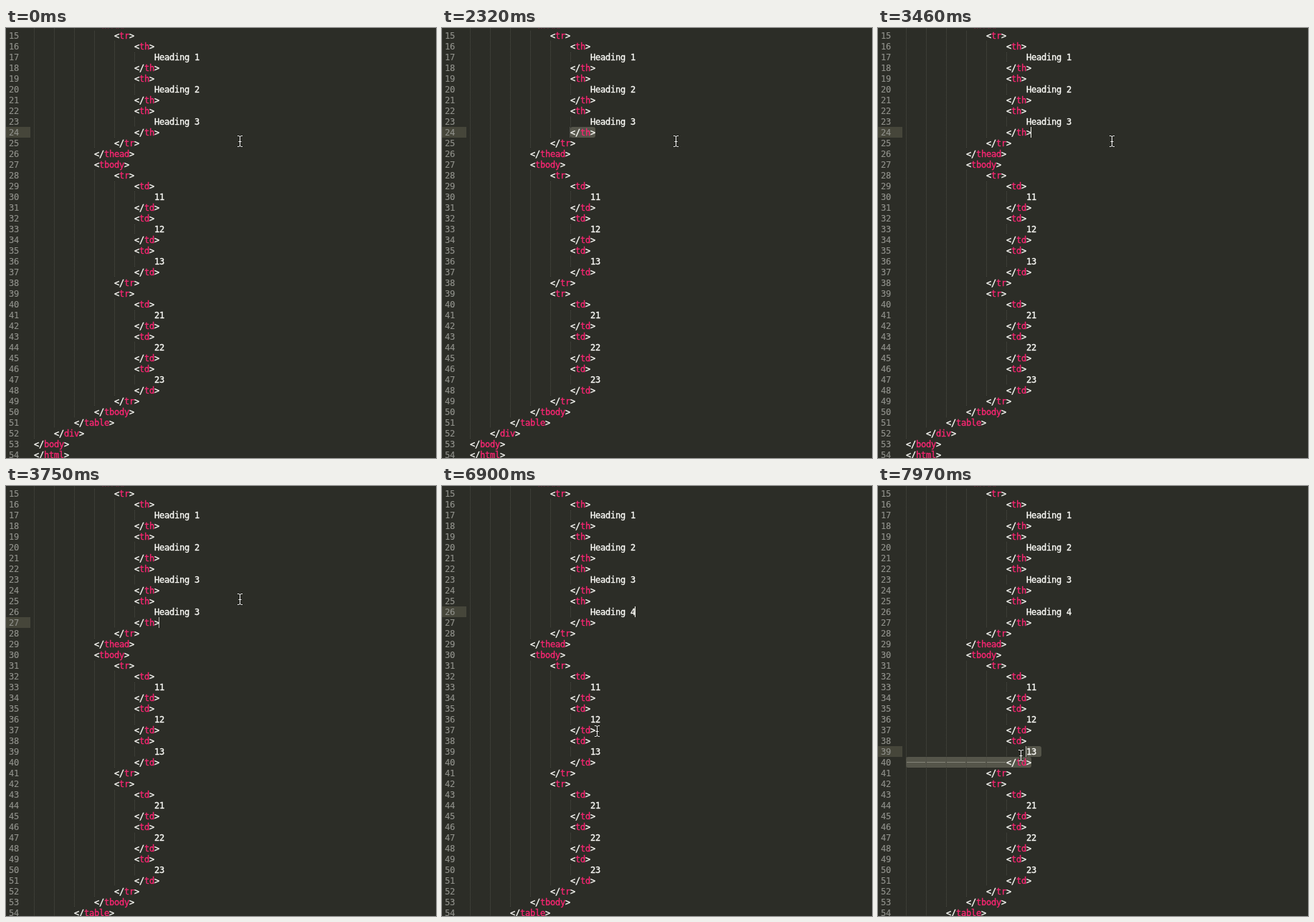
Animation of 600 by 600 pixels, one loop 8000 ms. Source, as an HTML page with a canvas:

```html
<!DOCTYPE html>
<html lang="en">
<head>
<meta charset="utf-8">
<title>Code editor</title>
<style>
  html, body { margin: 0; width: 100%; height: 100%; overflow: hidden; background: #2c2d27; }
  canvas { display: block; }
</style>
</head>
<body>
<canvas id="stage" width="600" height="600"></canvas>
<script>
const ctx = document.getElementById('stage').getContext('2d');
const LOOP = 8000, CHAR = 7, LINE = 15, TAB = 4, LEFT = 39, FIRST = 14;
const DRAG = 7500, BLINK = 1040;
const WHITE = '#fcfcf8', PINK = '#f92672';

const clamp = (v, lo = 0, hi = 1) => Math.min(hi, Math.max(lo, v));
const rowY = row => 3 + (row - 15) * LINE;
const colX = col => LEFT + col * CHAR;

// Key presses: time, caret row, caret column, whether text is selected to the line end of row 24
const keys = [
  [-595, 24, 25], [1850, 24, 20, true], [2410, 23, 20, true], [2530, 22, 20, true],
  [3140, 24, 25], [3540, 25, 20], [3750, 27, 25], [4330, 26, 25], [4690, 26, 33],
  [4860, 26, 32], [5130, 26, 33], [5650, 26, 32], [5760, 26, 33]
];

// Pointer path: time, x, y
const path = [
  [6650, 326, 158], [6900, 216, 342], [7030, 206, 388], [7180, 207, 397],
  [7440, 215, 392], [7600, 215, 392], [7780, 207, 385], [7960, 199, 376]
];

function pointer(t) {
  if (t <= path[0][0]) return path[0].slice(1);
  const i = path.findIndex(p => p[0] > t);
  if (i < 0) return path[path.length - 1].slice(1);
  const a = path[i - 1], b = path[i], u = (t - a[0]) / (b[0] - a[0]);
  return [1, 2].map(k => a[k] + (b[k] - a[k]) * u);
}

// Each line is [indent, text]
const wrap = (tag, indent, inner) => [[indent, `<${tag}>`], ...inner, [indent, `</${tag}>`]];
const cell = (tag, text) => wrap(tag, 5, [[6, text]]);

function documentAt(t) {
  const heads = [1, 2, 3].flatMap(n => cell('th', 'Heading ' + n));
  if (t >= 3750) {
    heads.push(...cell('th', 'Heading ' + (t < 5650 ? '3' : t < 5760 ? '' : '4')));
  } else if (t >= 3540) {
    heads.push([5, '']);
  }
  const rows = [1, 2].flatMap(r => wrap('tr', 4, [1, 2, 3].flatMap(c => cell('td', `${r}${c}`))));
  return [
    ...wrap('thead', 3, wrap('tr', 4, heads)),
    ...wrap('tbody', 3, rows),
    [2, '</table>'], [1, '</div>'], [0, '</body>'], [0, '</html>']
  ];
}

const lineEnd = ([indent, text]) => indent * TAB + text.length;

function caretAt(t, lines) {
  if (t < DRAG) {
    const [time, row, col, selecting] = keys.filter(k => k[0] <= t).pop();
    return { row, col, age: t - time, anchor: selecting && [24, 25] };
  }
  const [x, y] = pointer(t);
  const row = 15 + Math.floor((y - 3) / LINE);
  const line = lines[row - FIRST];
  let col = (x - LEFT) / CHAR;
  col = col < line[0] * TAB ? Math.round(col / TAB) * TAB : Math.round(col);
  return { row, col: Math.min(col, lineEnd(line)), age: 0, anchor: [40, 25] };
}

function blink(age) {
  return clamp(0.5 + 0.84 * Math.cos((age - 195) / BLINK * 2 * Math.PI)) ** 2;
}

function drawSelection(caret, lines) {
  const [endRow, endCol] = caret.anchor;
  for (let row = caret.row; row <= endRow; row++) {
    const line = lines[row - FIRST], y = rowY(row);
    const from = row === caret.row ? caret.col : 0;
    const to = row === endRow ? endCol : lineEnd(line) + 1;
    if (from >= to) continue;
    ctx.fillStyle = '#55554a';
    ctx.beginPath();
    ctx.roundRect(colX(from), y, (to - from) * CHAR, LINE, 3);
    ctx.fill();
    ctx.fillStyle = '#858579';
    for (let tab = Math.ceil(from / TAB); tab < line[0]; tab++) {
      ctx.fillRect(colX(tab * TAB) + 1, y + 7, TAB * CHAR - 2, 1);
    }
  }
}

function drawText(text, x, y, colorOf) {
  [...text].forEach((ch, i) => {
    ctx.fillStyle = ctx.strokeStyle = colorOf(ch);
    ctx.fillText(ch, x + i * CHAR, y);
    ctx.strokeText(ch, x + i * CHAR, y);
  });
}

function drawLine([indent, text], row) {
  const y = rowY(row);
  ctx.fillStyle = '#4c4d45';
  for (let i = 0; i < indent; i++) {
    for (let dot = y + y % 2; dot < y + LINE; dot += 2) ctx.fillRect(colX(i * TAB), dot, 1, 1);
  }
  ctx.lineWidth = 0.15;
  drawText(String(row), 4, y + 12, () => '#90918b');
  const isTag = text[0] === '<';
  ctx.lineWidth = 0.35;
  drawText(text, colX(indent * TAB), y + 12, ch => isTag && !'</>'.includes(ch) ? PINK : WHITE);
}

function drawPointer(x, y) {
  ctx.save();
  ctx.translate(Math.round(x) + 0.5, Math.round(y));
  const beam = new Path2D('M-3.5-7.5H-2Q0-7.5 0-5.5Q0-7.5 2-7.5H3.5M0-5.5V5.5M-3.5 7.5H-2Q0 7.5 0 5.5Q0 7.5 2 7.5H3.5M-2 .5H2');
  for (const [color, width] of [['rgba(20,20,16,.55)', 2.4], ['#fff', 1]]) {
    ctx.strokeStyle = color;
    ctx.lineWidth = width;
    ctx.stroke(beam);
  }
  ctx.restore();
}

function draw(t) {
  const lines = documentAt(t), caret = caretAt(t, lines);
  ctx.fillStyle = '#2c2d27';
  ctx.fillRect(0, 0, 600, 600);
  ctx.fillStyle = '#46463a';
  ctx.fillRect(0, rowY(caret.row), 34, LINE);
  if (caret.anchor) drawSelection(caret, lines);

  ctx.font = '12px "DejaVu Sans Mono", monospace';
  lines.forEach((line, i) => drawLine(line, FIRST + i));

  ctx.globalAlpha = blink(caret.age);
  ctx.fillStyle = '#f8f8f0';
  ctx.fillRect(colX(caret.col) - 1, rowY(caret.row), 1, LINE);
  ctx.globalAlpha = 1;
  drawPointer(...pointer(t));
}

const start = performance.now();
function tick() {
  draw((performance.now() - start) % LOOP);
  requestAnimationFrame(tick);
}
tick();
</script>
</body>
</html>
```
